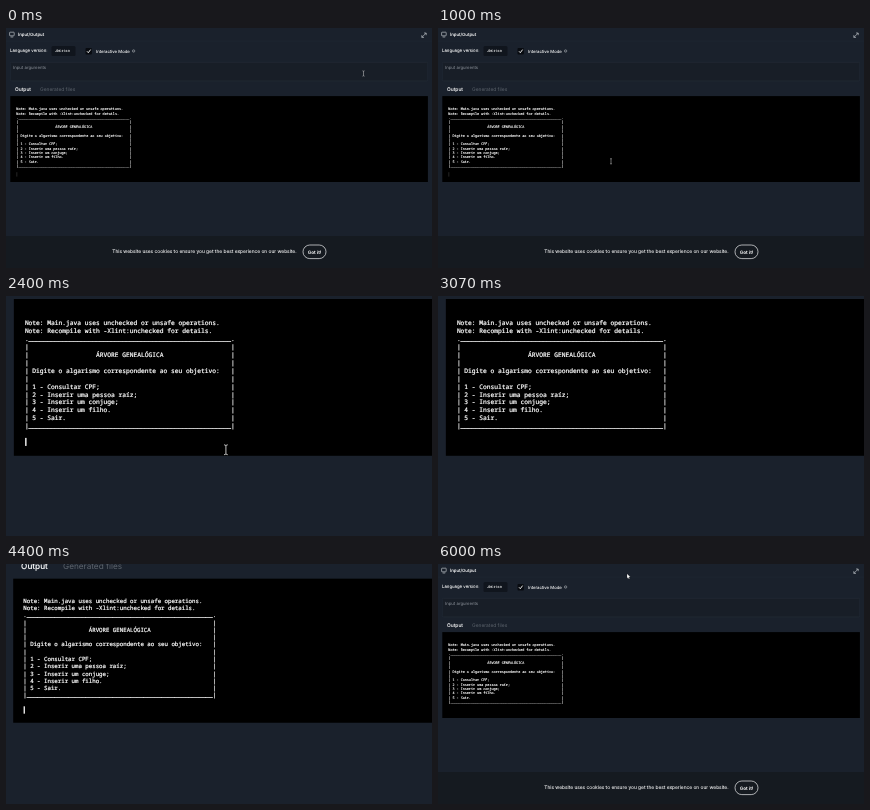
These frames come from a looping animation (426 px wide and 240 px high, 6.07 s). An HTML page:

```html
<!DOCTYPE html>
<html lang="en">
<head>
<meta charset="utf-8">
<title>Input/Output</title>
<style>
  html, body { margin: 0; width: 100%; height: 100%; overflow: hidden; background: #1a212c; }
  svg { display: block; width: 100vw; height: 100vh; }
  text { fill: #fff; stroke: #fff; stroke-width: .06; font-family: Inter, sans-serif; text-rendering: geometricPrecision; white-space: pre; }
  .dim { fill: #8d939b; stroke: none; }
  .faint { fill: #5d646d; stroke: none; }
  .term text { font: 3.435px "Noto Sans Mono", monospace; stroke-width: .13; }
  .icon { fill: none; stroke: #d4d8dc; stroke-width: .6; }
</style>
</head>
<body>
<svg viewBox="0 0 426 240">
  <g id="view">
    <rect width="426" height="240" fill="#1a212c"/>

    <rect x="3.6" y="4.2" width="4.6" height="3.6" rx=".5" class="icon"/>
    <path d="M4.6 9h2.6" class="icon"/>
    <text x="12" y="8" font-size="4.3" font-weight="500">Input/Output</text>
    <path d="M416 9.2 420 5.2M418 5h2.2v2.2M415.8 7.2v2.2h2.2" class="icon"/>
    <path d="M0 13.2h426" stroke="#222a36" stroke-width=".4"/>

    <text x="4" y="24.4" font-size="4.3">Language version:</text>
    <rect x="45.5" y="18" width="24" height="10" rx="1.5" fill="#10151d"/>
    <text x="49" y="24.2" font-size="2.95" font-weight="500">JDK 21.0.0</text>
    <rect x="79.5" y="20" width="6.4" height="6.4" rx="1" fill="#080b10"/>
    <path d="M81 23.3l1.3 1.4 2.3-3.1" fill="none" stroke="#fff" stroke-width=".9"/>
    <text x="90" y="24.6" font-size="4.25">Interactive Mode</text>
    <circle cx="127.6" cy="23" r="1.2" class="icon" opacity=".75"/>
    <circle cx="127.6" cy="23" r=".3" fill="#d4d8dc"/>

    <rect x="4.3" y="34.3" width="417.4" height="18.6" rx="1" fill="#181e27" stroke="#262e3a" stroke-width=".5"/>
    <text x="7" y="41.4" font-size="4.3" class="dim">Input arguments</text>

    <text x="9" y="62.6" font-size="4.9" font-weight="500">Output</text>
    <text x="34" y="62.6" font-size="4.9" class="faint">Generated files</text>

    <rect x="4.3" y="68.1" width="417.6" height="85.9" fill="#000"/>
    <g class="term" id="term"></g>
    <rect id="caret" x="10.5" y="144.2" width=".75" height="4.4" fill="#fff"/>

    <rect y="208" width="426" height="32" fill="#151a20"/>
    <text x="106.3" y="225.4" font-size="4.83">This website uses cookies to ensure you get the best experience on our website.</text>
    <rect x="297" y="217" width="23" height="13.6" rx="6.8" fill="none" stroke="#eceef0" stroke-width=".7"/>
    <text x="308.5" y="225.5" font-size="4.7" font-weight="600" text-anchor="middle">Got it!</text>

    <g id="pointer">
      <path id="beam" d="M-1-2.7Q0-2.7 0-2.1Q0-2.7 1-2.7M0-2.1V2.1M-1 2.7Q0 2.7 0 2.1Q0 2.7 1 2.7" fill="none" stroke="#d5d5d5" stroke-width=".5"/>
      <path id="arrow" d="M0-2.3V2.4L1.1 1.4 1.8 3 2.7 2.6 2 1.1H3.4Z" fill="#fff" stroke="#000" stroke-width=".2"/>
    </g>
  </g>
</svg>
<script>
const LOOP = 6070, FRAME = 200 / 3;
const ZOOM = 1.825, FOCUS_Y = 147;
const COLS = 54, ROW = 4.35, LEFT = 10.35, BASE = 82.4;
const $ = id => document.getElementById(id);

const row = (s = '') => '|' + s.padEnd(COLS) + '|';
const rule = '_'.repeat(COLS);
const lines = [
  'Note: Main.java uses unchecked or unsafe operations.',
  'Note: Recompile with -Xlint:unchecked for details.',
  '.' + rule + '.',
  row(),
  row(' '.repeat(18) + 'ÁRVORE GENEALÓGICA'),
  row(),
  row(' Digite o algarismo correspondente ao seu objetivo:'),
  row(),
  row(' 1 - Consultar CPF;'),
  row(' 2 - Inserir uma pessoa raíz;'),
  row(' 3 - Inserir um conjuge;'),
  row(' 4 - Inserir um filho.'),
  row(' 5 - Sair.'),
  '|' + rule + '|'
];
lines.forEach((line, i) => {
  const text = document.createElementNS('http://www.w3.org/2000/svg', 'text');
  text.setAttribute('x', LEFT);
  text.setAttribute('y', BASE + i * ROW);
  text.textContent = line;
  $('term').append(text);
});

// Smooth 0..1 ramp between two times
const ease = (t, from, to) => {
  const p = Math.min(1, Math.max(0, (t - from) / (to - from)));
  return p * p * (3 - 2 * p);
};

// Pointer moves: start, end, x, y
const start = [357.5, 45.5];
const moves = [
  [150, 950, 173, 133.3],
  [1150, 1950, 120.5, 150.7],
  [2600, 3350, 189, 12]
];

function pointerAt(t) {
  let [x, y] = start;
  for (const [from, to, nx, ny] of moves) {
    const p = ease(t, from, to);
    x += (nx - x) * p;
    y += (ny - y) * p;
  }
  return [x, y];
}

function draw(t) {
  const zoom = 1 + (ZOOM - 1) * (ease(t, 1300, 2300) - ease(t, 4130, 5130));
  $('view').setAttribute('transform', `translate(0 ${FOCUS_Y * (1 - zoom)}) scale(${zoom})`);

  const [x, y] = pointerAt(t);
  const overText = (y > 34 && y < 53) || (y > 68 && y < 154);
  $('pointer').setAttribute('transform', `translate(${x} ${y})`);
  $('beam').setAttribute('opacity', overText ? 1 : 0);
  $('arrow').setAttribute('opacity', overText ? 0 : 1);

  const blink = (t - 2100) % 1000 < 500 ? 1 : 0;
  $('caret').setAttribute('opacity', t < 2100 ? 0.2 : blink);
}

const begin = performance.now();
function tick() {
  const t = (performance.now() - begin) % LOOP;
  draw(Math.floor((t + 4) / FRAME) * FRAME);
  requestAnimationFrame(tick);
}
draw(0);
requestAnimationFrame(tick);
</script>
</body>
</html>
```
